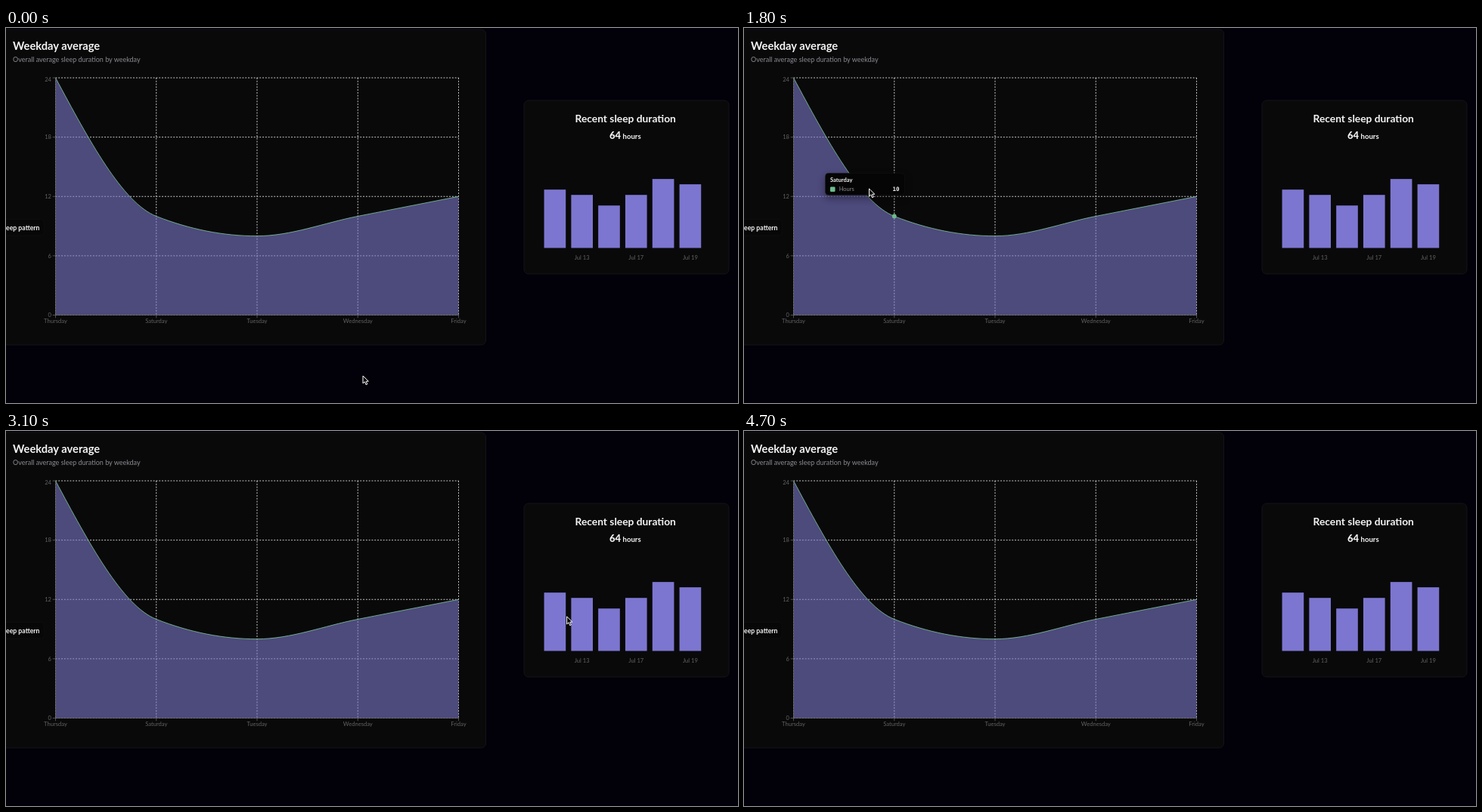
An HTML page that plays this animation: 968x497 px, repeating every 4.8 s.

```html
<!DOCTYPE html>
<html lang="en">
<head>
<meta charset="utf-8">
<title>Sleep dashboard</title>
<style>
  html, body { margin: 0; width: 100%; height: 100%; overflow: hidden; background: #02010a; }
  svg { display: block; width: 968px; height: 497px; font-family: Lato, "Open Sans", sans-serif; }
  .card { fill: #09090a; stroke: #141416; }
  .bold { font-weight: 700; fill: #f4f4f5; }
  .muted { fill: #8b8b92; }
  .axis text { font-size: 7.6px; fill: #626262; }
  .axis path { stroke: #626262; stroke-width: .8; }
  .grid { stroke: #ccc; stroke-dasharray: 1.9 1.9; fill: none; }
  .mid { text-anchor: middle; }
  .end { text-anchor: end; }
  .tip rect.box { fill: #050506; stroke: #151517; stroke-width: .6; filter: drop-shadow(0 4px 5px #0006); }
  .tip text { font-size: 7.5px; }
  .tip .value { font: 700 7.5px "DejaVu Sans Mono", monospace; }
</style>
</head>
<body>
<svg viewBox="0 0 968 497">
  <rect class="card" x="-60" y="2" width="694.5" height="418" rx="6"/>
  <text class="bold" x="9" y="29" font-size="14.7">Weekday average</text>
  <text class="muted" x="9" y="44.5" font-size="9">Overall average sleep duration by weekday</text>
  <rect x="-40" y="253.5" width="90" height="21.5" rx="4" fill="#070708" stroke="#111113" stroke-width=".6"/>
  <text class="bold end" x="44.5" y="267.5" font-size="8.7">Sleep pattern</text>
  <g id="area"></g>

  <rect class="card" x="685" y="96" width="271" height="230" rx="6"/>
  <text class="bold mid" x="819.2" y="124.5" font-size="13.8">Recent sleep duration</text>
  <text class="bold" x="798" y="147.3" font-size="13" style="font-weight: 800">64</text>
  <text class="bold" x="815.5" y="146.8" font-size="9.6">hours</text>
  <rect id="band" y="179.5" width="35.8" height="112" fill="#c6c6c6"/>
  <g id="bars"></g>

  <circle id="dot" r="2.9" fill="#6dbb8c"/>
  <g id="tip" class="tip">
    <rect class="box" width="105" height="28.8" rx="4"/>
    <text id="tipName" class="bold" x="6.3" y="11.4"></text>
    <rect id="tipKey" x="6.3" y="18" width="6.6" height="6.6" rx="1.2"/>
    <text class="muted" x="18" y="24">Hours</text>
    <text id="tipValue" class="bold value end" x="98" y="24"></text>
  </g>
  <path id="pointer" d="M0 0V10L2.4 7.9 4.1 11.8 5.8 11 4.2 7.3 7.3 7.2Z"
        fill="#0a0a0a" stroke="#fff" stroke-linejoin="round"/>
</svg>
<script>
const $ = id => document.getElementById(id);
const LOOP = 4800, STEP = 100;

const days = [["Thursday", 24], ["Saturday", 10], ["Tuesday", 8], ["Wednesday", 10], ["Friday", 12]];
const nights = [["Jul 11", 11], ["Jul 13", 10], ["Jul 15", 8], ["Jul 17", 10], ["Jul 18", 13], ["Jul 19", 12]];

const LEFT = 65.5, RIGHT = 598.5, TOP = 66, BASE = 380.5, GAP = 133.25;
const BARS = 708, BAND = 35.8;
const dayX = i => LEFT + i * GAP;
const hourY = h => BASE - h * (BASE - TOP) / 24;
const bandX = i => BARS + i * BAND;

function drawArea() {
  const pts = days.map(([, h], i) => [dayX(i), hourY(h)]);
  const s = pts.slice(1).map((p, i) => (p[1] - pts[i][1]) / GAP);

  // Tangents of a monotone cubic
  const m = pts.map((p, i) => {
    const a = s[i - 1], b = s[i];
    return a * b > 0 ? 2 * Math.sign(a) * Math.min(Math.abs(a), Math.abs(b), Math.abs(a + b) / 4) : 0;
  });
  m[0] = (3 * s[0] - m[1]) / 2;
  m[4] = (3 * s[3] - m[3]) / 2;

  const d = GAP / 3;
  let curve = `M${pts[0]}`;
  for (let i = 1; i < pts.length; i++) {
    const [x0, y0] = pts[i - 1], [x1, y1] = pts[i];
    curve += `C${x0 + d} ${y0 + d * m[i - 1]} ${x1 - d} ${y1 - d * m[i]} ${x1} ${y1}`;
  }

  let grid = "", ticks = `M${LEFT} ${TOP}V${BASE}H${RIGHT}`, labels = "";
  for (let h = 0; h <= 24; h += 6) {
    const y = hourY(h);
    grid += `M${LEFT} ${y}H${RIGHT}`;
    ticks += `M${LEFT} ${y}h-3.8`;
    labels += `<text class="end" x="60" y="${Math.max(y + 2.7, 71)}">${h}</text>`;
  }
  days.forEach(([name], i) => {
    const x = dayX(i);
    grid += `M${x} ${TOP}V${BASE}`;
    ticks += `M${x} ${BASE}v3.8`;
    labels += `<text class="mid" x="${x}" y="391.3">${name}</text>`;
  });

  $("area").innerHTML = `<path class="grid" d="${grid}"/>
    <path d="${curve}V${BASE}H${LEFT}Z" fill="#7a75c8" fill-opacity=".6"/>
    <path d="${curve}" fill="none" stroke="#82ca9d" stroke-width=".8"/>
    <g class="axis"><path d="${ticks}" fill="none"/>${labels}</g>`;
}

function drawBars() {
  $("bars").innerHTML = nights.map(([name, h], i) => {
    const x = bandX(i), tall = h * 7.03;
    const label = i % 2 ? `<text class="mid" x="${x + BAND / 2}" y="306.5">${name}</text>` : "";
    return `<rect x="${x + BAND * .1}" y="${291.5 - tall}" width="${BAND * .8}" height="${tall}" fill="#7c76d0"/>
      <g class="axis">${label}</g>`;
  }).join("");
}

// Turning points of the pointer: [time, x, y]
const turns = [
  [0, 472, 461], [500, 215, 330], [900, 150, 223], [1000, 116.5, 220], [1250, 85, 168],
  [1500, 90, 168], [1800, 165.5, 213], [2550, 540, 250], [2700, 586, 251], [3250, 800, 244],
  [3400, 735, 241], [3650, 736, 243], [3740, 880, 250], [3900, 883, 253], [4080, 838, 254], [4400, 908, 256]
];
const GONE = 4500, LAG = 100;

function pointerAt(t) {
  const next = turns.findIndex(k => k[0] > t);
  if (next < 0) return turns[turns.length - 1].slice(1);
  const a = turns[Math.max(next - 1, 0)], b = turns[next];
  const u = Math.max(0, (t - a[0]) / (b[0] - a[0]));
  return [a[1] + (b[1] - a[1]) * u, a[2] + (b[2] - a[2]) * u];
}

// The chart item under a point, and where its tooltip wants to be
function hoverAt([x, y]) {
  if (x >= LEFT && x <= RIGHT && y >= TOP && y <= BASE) {
    const item = Math.round((x - LEFT) / GAP);
    return { onArea: true, item, goal: [tipX(dayX(item), RIGHT), y + 8] };
  }
  const item = Math.floor((x - BARS) / BAND);
  if (!nights[item]) return null;
  return { onArea: false, item, goal: [tipX(bandX(item) + BAND / 2, 950), y + 8] };
}

const tipX = (x, limit) => x + 112 > limit ? x - 112 : x + 7;

// The tooltip chases its goal in short equal steps
function simulate() {
  const frames = [];
  let tip = null;
  for (let t = 0; t < LOOP; t += 20) {
    const hover = t < GONE ? hoverAt(pointerAt(t - LAG)) : null;
    tip = hover && (tip ? tip.map((v, i) => v + (hover.goal[i] - v) * .14) : hover.goal);
    if (t % STEP === 0) frames.push({ hover, tip, pointer: t < GONE && pointerAt(t) });
  }
  return frames;
}

const show = (id, on) => $(id).style.display = on ? "" : "none";
const place = (id, [x, y]) => $(id).setAttribute("transform", `translate(${x} ${y})`);

function render({ hover, tip, pointer }) {
  show("pointer", pointer);
  show("tip", hover);
  show("dot", hover && hover.onArea);
  show("band", hover && !hover.onArea);
  if (pointer) place("pointer", pointer);
  if (!hover) return;

  const { onArea, item } = hover;
  const [name, hours] = (onArea ? days : nights)[item];
  place("tip", tip);
  $("tipName").textContent = onArea ? name : name + ", 2024";
  $("tipValue").textContent = hours;
  $("tipKey").setAttribute("fill", onArea ? "#6dbb8c" : "#7c76d0");
  if (onArea) place("dot", [dayX(item), hourY(hours)]);
  else $("band").setAttribute("x", bandX(item));
}

drawArea();
drawBars();
const frames = simulate();
render(frames[0]);
const start = performance.now();
requestAnimationFrame(function tick() {
  const t = (performance.now() - start) % LOOP;
  render(frames[Math.floor(t / STEP)]);
  requestAnimationFrame(tick);
});
</script>
</body>
</html>
```
